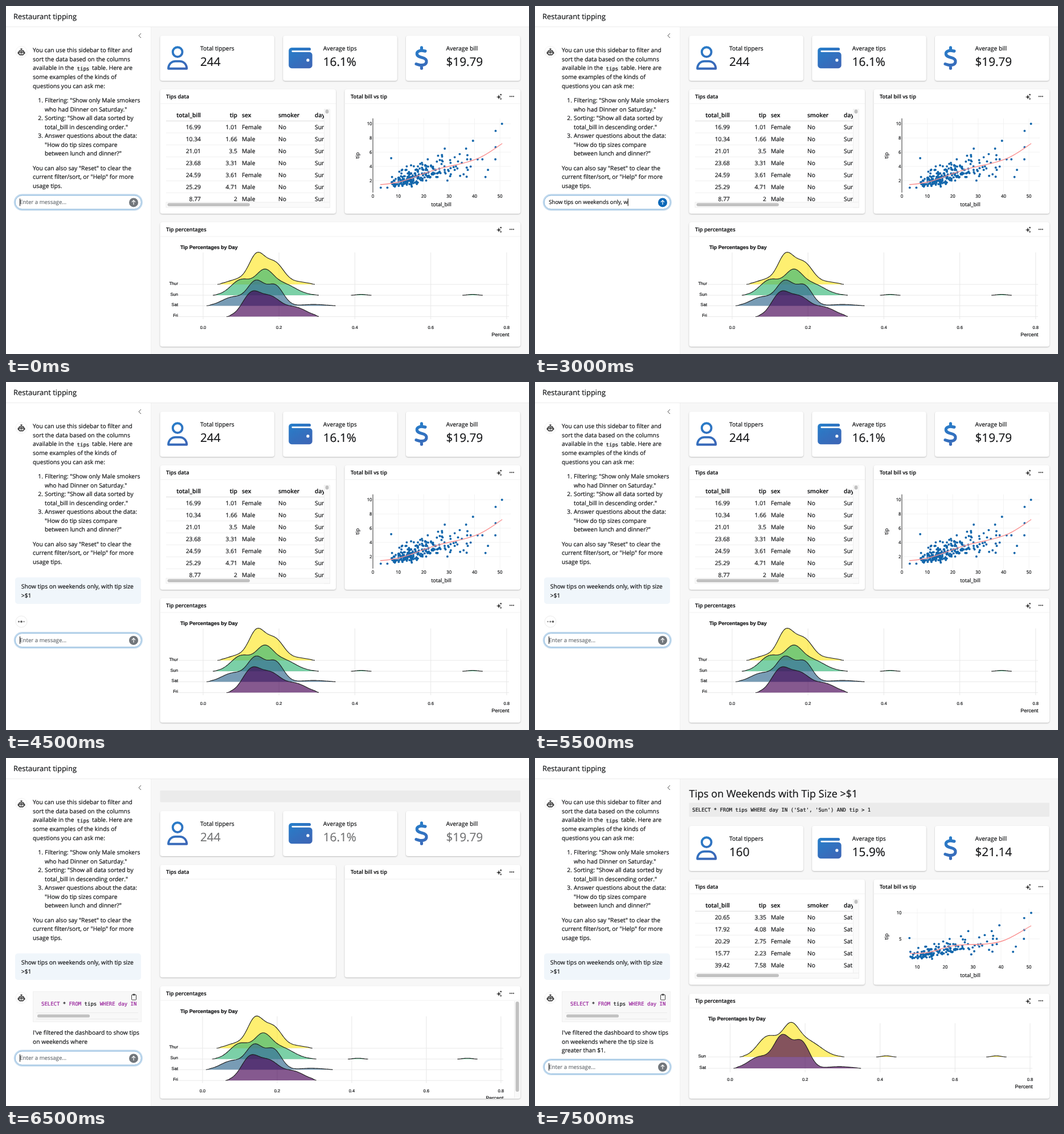
Write an HTML page that moves like this. It is 918x610 px and loops after 8000 ms.

```html
<!DOCTYPE html>
<html lang="en">
<head>
<meta charset="utf-8">
<title>Restaurant tipping</title>
<style>
html, body { margin: 0; width: 100%; height: 100%; overflow: hidden; background: #fff; }
svg { display: block; width: 918px; height: 610px; color: #141517; font-family: "Open Sans", "Noto Sans", sans-serif; }
text, tspan { fill: currentColor; stroke: currentColor; stroke-width: .2px; text-rendering: geometricPrecision; }
.mono { font-family: "DejaVu Sans Mono", "Liberation Mono", monospace; }
.arial { font-family: "Liberation Sans", Arial, sans-serif; }
.bold { font-weight: 600; }
.hint { color: #6b7075; }
.key { color: #961f9a; }
.end { text-anchor: end; }
.mid { text-anchor: middle; }
.card { fill: #fff; filter: drop-shadow(0 1px 1.3px rgba(0, 0, 0, .24)); }
</style>
</head>
<body>
<svg id="stage" viewBox="0 0 918 610" xmlns="http://www.w3.org/2000/svg"></svg>
<script>
const STEP = 500;
const BLUE = '#0767b8', GRAY = '#71767b', GRID = '#ebebeb', THUMB = '#c1c1c1';
const BODY = 10.34, SMALL = 9.66, CODE = 8.97;

// Drawing helpers; text is placed by the middle of its capitals.
const text = (x, y, s, size = BODY, cls = '', attrs = '') =>
  `<text x="${x}" y="${(y + size * .357).toFixed(2)}" font-size="${size}" class="${cls}" ${attrs}>${s}</text>`;
const lines = (x, y, pitch, rows, size) => rows.map((s, i) => text(x, y + i * pitch, s, size)).join('');
const rect = (x, y, w, h, fill, attrs = '') =>
  `<rect x="${x}" y="${y}" width="${w}" height="${h}" fill="${fill}" ${attrs}/>`;
const dot = (x, y, r, fill, attrs = '') => `<circle cx="${x}" cy="${y}" r="${r}" fill="${fill}" ${attrs}/>`;
const path = (d, attrs) => `<path d="${d}" ${attrs}/>`;
const stroke = (d, color, w = 1) => path(d, `fill="none" stroke="${color}" stroke-width="${w}"`);
const hline = (x1, x2, y, color = GRID, w = 1) => stroke(`M${x1} ${y}H${x2}`, color, w);
const vline = (x, y1, y2, color = GRID, w = 1) => stroke(`M${x} ${y1}V${y2}`, color, w);
const group = (inner, attrs) => `<g ${attrs}>${inner}</g>`;
const clip = (id, x, y, w, h, inner) =>
  `<clipPath id="${id}">${rect(x, y, w, h, '#000')}</clipPath>` + group(inner, `clip-path="url(#${id})"`);
const each = (list, fn) => list.map(fn).join('');

const ruler = document.createElement('canvas').getContext('2d');
ruler.font = `100px "Open Sans", "Noto Sans", sans-serif`;
const widthOf = s => ruler.measureText(s).width * SMALL / 100;

// Icons
const defs = `<defs><linearGradient id="tint" gradientUnits="userSpaceOnUse" x1="0" y1="0" x2="300" y2="512">
  <stop offset="0" stop-color="#2580cb"/><stop offset="1" stop-color="#3c67b7"/></linearGradient></defs>`;
const ICON = {
  user: dot(224, 128, 104, 'none', 'stroke="url(#tint)" stroke-width="48"') +
    path('M25 488C25 395 90 328 178 328H270C358 328 423 395 423 488Z',
      'fill="none" stroke="url(#tint)" stroke-width="48" stroke-linejoin="round"'),
  wallet: path('M64 32H448a32 32 0 0 1 0 64H80a16 16 0 0 0 0 32H448a64 64 0 0 1 64 64V416a64 64 0 0 1-64 64H64a64 64 0 0 1-64-64V96a64 64 0 0 1 64-64zM416 272a32 32 0 1 1 0 64 32 32 0 1 1 0-64z',
    'fill="url(#tint)" fill-rule="evenodd"'),
  dollar: path('M160 32V95M160 415V480M240 109L192 100C120 90 64 112 59 157C50 225 125 235 166 246C235 264 275 285 265 345C255 400 190 420 118 409Q90 404 43 387',
    'fill="none" stroke="url(#tint)" stroke-width="64" stroke-linecap="round"')
};
const robot = y => dot(27, y, 10, '#fff', 'stroke="#f2f2f2"') + group(
  rect(22.6, -2.7, 8.8, 8, 'none', 'rx="2.8" stroke="#222" stroke-width="1.3"') +
  rect(23.6, -1, 6.8, 2.8, '#222', 'rx="1.2"') + dot(25.3, .4, .6, '#fff') + dot(28.7, .4, .6, '#fff') +
  stroke('M25 3.5h4M27-3v-2.4M25.4-5.4h3.2M21.2 0v3.2M32.8 0v3.2', '#222', 1.2), `transform="translate(0 ${y})"`);
const star = (x, y, r) => path(`M${x} ${y - r}q0 ${r} ${r} ${r}q${-r} 0 ${-r} ${r}q0 ${-r} ${-r} ${-r}q${r} 0 ${r} ${-r}`,
  'fill="#222" stroke="#222" stroke-width=".5"');
const tools = y => star(865, y + 1, 3.6) + star(868.6, y - 3, 1.6) + star(868.6, y + 4.3, 1.4) +
  each([-3, 0, 3], d => dot(887.8 + d, y, 1.1, '#222'));

// Cards
function card(x, y, w, h, title, withTools) {
  const head = title ? text(x + 10.5, y + 12.5, title, 9.25, 'bold') + hline(x, x + w, y + 25, '#f1f1f1') : '';
  return rect(x, y, w, h, '#fff', 'rx="4" class="card"') + head + (withTools ? tools(y + 12.5) : '');
}
const panels = (y, h) => card(270.5, y, 308.5, h, 'Tips data') + card(594.5, y, 308.5, h, 'Total bill vs tip', true);
const ridgeCard = y => card(270.5, y, 632.5, 597 - y, 'Tip percentages', true);

function valueBoxes(y, values, fade = 1) {
  const kinds = [['user', 12.5, 'Total tippers'], ['wallet', 10, 'Average tips'], ['dollar', 14.5, 'Average bill']];
  return each(kinds, ([icon, dx, label], i) => {
    const x = 270.5 + i * 215.75;
    return card(x, y, 200.5, 79) + group(ICON[icon], `transform="translate(${x + dx} ${y + 18.3}) scale(.0809)"`) +
      text(x + 70.5, y + 22, label) + text(x + 70.5, y + 46, values[i], 20.7, '', `opacity="${fade}"`);
  });
}

// Data table
const rowsAll = '16.99 1.01 Female|10.34 1.66 Male|21.01 3.5 Male|23.68 3.31 Male|24.59 3.61 Female|25.29 4.71 Male|8.77 2 Male';
const rowsWeekend = '20.65 3.35 Male|17.92 4.08 Male|20.29 2.75 Female|15.77 2.23 Female|39.42 7.58 Male';
function table(top, bottom, rows, day) {
  const row = (y, cells, cls) => each(cells, (s, i) =>
    text([342, 406, 414, 478, 542][i], y, s, BODY, cls + (i < 2 ? ' end' : '')));
  const body = each(rows.split('|'), (line, i) => {
    const y = top + 31 + i * 21;
    return hline(281, 558, y - 10.5, i ? '#f0f0f0' : '#dcdcdc') + row(y, [...line.split(' '), 'No', day], '');
  });
  const head = row(top + 10, ['total_bill', 'tip', 'sex', 'smoker', 'day'], 'bold');
  return clip('view', 281, top, 277.5, bottom - top, head + body) +
    rect(558.5, top, 10, bottom - top + 9, '#fafafa', 'stroke="#eee"') + rect(281, bottom, 287.5, 9, '#fafafa', 'stroke="#eee"') +
    rect(560.5, top + .5, 6, 7, THUMB, 'rx="3"') + rect(283.5, bottom + 1.5, 144.5, 5.5, THUMB, 'rx="2.75"');
}

// Bills and tips: a seeded cloud plus the few far points.
let seed = 20;
const rnd = () => (seed = (seed * 1664525 + 1013904223) % 4294967296) / 4294967296;
const bell = () => (rnd() + rnd() + rnd() + rnd() - 2) * 1.73;
const clamp = (v, low, high) => Math.min(high, Math.max(low, v));
const cloud = n => Array.from({ length: n }, () => {
  const bill = clamp(Math.exp(2.88 + .42 * bell()), 7.3 + rnd(), 36 + 3 * rnd());
  const tip = clamp(.28 * bill ** .78 * Math.exp(.27 * bell()), 1.15, 6.5);
  return [bill, rnd() < .3 ? Math.max(1.25, Math.round(tip * 2) / 2) : tip];
});
const weekend = [[50.8, 10], [48.3, 9], [48.3, 6.7], [48.2, 5], [39.4, 7.6], [45.3, 3.5], [44.3, 2.5], [7.2, 5.15], ...cloud(152)];
const everyDay = [...weekend, [3.1, 1], [5.7, 1], [41.2, 5], [43.1, 5], ...cloud(80)];

function scatter(o) {
  const X = v => o.x0 + v * o.kx, Y = v => o.y0 - v * o.ky;
  return each([10, 20, 30, 40, 50], v => vline(X(v), o.top, o.base, '#f0f0f0', .8) + text(X(v), o.base + 6.5, v, 7.76, 'mid')) +
    each(o.ticks, v => hline(o.left, 886, Y(v), '#f0f0f0', .8) + text(o.left - 1.5, Y(v), v, 7.76, 'end')) +
    (o.zero ? vline(X(0), o.top, o.base, '#444', 1.1) + text(X(0), o.base + 6.5, 0, 7.76, 'mid') : '') +
    each(o.data, ([b, t]) => dot(X(b).toFixed(1), Y(t).toFixed(1), 1.95, '#1266ab')) +
    stroke(o.trend, '#fa9090', 1.4) + text(764, o.base + 21, 'total_bill', 9.05, 'mid') +
    group(text(0, 0, 'tip', 9.05, 'mid'), `transform="translate(616.5 ${o.mid}) rotate(-90)"`);
}

// Ridge plot: each day is a sum of bells [centre, spread, height] over a span.
const DAYS = {
  Thur: { base: 488, span: [371, 543], bells: [[440, 14, 50], [472, 16, 37], [405, 16, 8], [515, 15, 4]] },
  Sun: { base: 507, span: [363, 550], bells: [[453, 15, 36], [413, 18, 27], [485, 23, 20]], bumps: [623.5, 819] },
  Sat: { base: 525.5, span: [352, 579], bells: [[439, 15, 42], [473, 14, 34], [398, 19, 15], [540, 20, 2.4]] },
  Fri: { base: 544.5, span: [387, 550], bells: [[431, 16, 40], [465, 17, 31], [507, 20, 16]] }
};
function hill(o, [from, to], bells, base, fill, grow) {
  let d = '';
  for (let x = from; x <= to; x += 1.5) {
    const edge = Math.min(1, (x - from) / 8, (to - x) / 8);
    const h = bells.reduce((sum, [c, s, k]) => sum + k * Math.exp(-(((x - c) / s) ** 2) / 2), 0) * edge;
    d += `${d ? 'L' : 'M'}${(o.x0 + (x - 346) * o.kx).toFixed(2)} ${(base - h * grow).toFixed(2)}`;
  }
  return path(d, `fill="${fill}" fill-opacity=".65" stroke="#1c1c1c" stroke-width="1.1"`);
}
function ridgePlot(o) {
  const X = v => o.x0 + v * 666 * o.kx, grow = o.grow || 1;
  const grid = each([0, .2, .4, .6, .8], v => vline(X(v), o.top, o.base, '#e9e9e9', 1.1) +
    text(X(v), o.tickY, v.toFixed(1), 7.5, 'mid'));
  const rows = each(o.days, ([name, y]) => hline(303, X(.8) + 4, y, '#e9e9e9', 1.1) + text(o.labelX, y - 2, name, 7.6, 'end'));
  const hills = each(o.days, ([name, y, fill]) => {
    const { span, bells, bumps = [] } = DAYS[name];
    return hill(o, span, bells, y, fill, grow) +
      each(bumps, c => hill(o, [c - 18, c + 18], [[c, 8, 1.5]], y, fill, grow));
  });
  return group(text(o.titleX, o.titleY, 'Tip Percentages by Day', 8.95, '', 'font-weight="700"') + grid + rows + hills +
    text(X(.8) + 4.5, o.tickY + 12.5, 'Percent', 9, 'end'), 'class="arial"');
}
const VIRIDIS = ['#fde725', '#35b779', '#31688e', '#440154'];
const allDays = (x0, kx, dy) => ridgePlot({
  x0, kx, titleX: 306, titleY: 423 + dy, top: 432 + dy, base: 549 + dy, tickY: 563 + dy, labelX: 302,
  days: Object.keys(DAYS).map((name, i) => [name, DAYS[name].base + dy, VIRIDIS[i]])
});
const weekendDays = () => ridgePlot({
  x0: 342.5, kx: .988, grow: 1.32, titleX: 304, titleY: 456.5, top: 465, base: 551, tickY: 563, labelX: 300,
  days: [['Sun', 524, VIRIDIS[0]], ['Sat', 544, VIRIDIS[3]]]
});

// Dashboard states
const total = ['244', '16.1%', '$19.79'];
const overview = valueBoxes(52, total) + panels(146, 218) + table(181, 344, rowsAll, 'Sun') +
  scatter({ x0: 644, kx: 4.46, y0: 330.8, ky: 12.43, ticks: [2, 4, 6, 8, 10], zero: true, left: 644, top: 197, base: 327,
    mid: 262, data: everyDay, trend: 'M657 313C710 310 720 293 778 281S840 262 871 241' }) +
  ridgeCard(379) + allDays(346, 1, 0);

const spinner = (x, y, opacity = 1) =>
  `<ellipse cx="${x}" cy="${y}" rx="2.6" ry="1.5" fill="#0a6ebd" opacity="${opacity}" transform="rotate(30 ${x} ${y})"/>`;
const spinners = each([[591, 40], [591, 60.5], [429, 291.8], [753, 291.8], [586, 504]], p => spinner(...p)) +
  each([405, 621, 837], x => spinner(x, 132, .4));
const waiting = (valueFade, plotFade) => rect(270.5, 57, 632.5, 20.5, GRID, 'rx="1"') +
  valueBoxes(93, total, valueFade) + panels(187.3, 197.2) + ridgeCard(400) +
  clip('plot', 271, 426, 632, 171, group(allDays(345, .983, 20.7), `opacity="${plotFade}"`)) +
  rect(892.5, 426, 10, 170, '#fafafa') + vline(892.5, 426, 596, '#eee') + rect(894.5, 427, 6, 158, THUMB, 'rx="3"');

const filtered = text(270.5, 63, 'Tips on Weekends with Tip Size &gt;$1', 18) + rect(270.5, 78.5, 632.5, 24.5, GRID, 'rx="1"') +
  text(276, 90.7, "SELECT * FROM tips WHERE day IN ('Sat', 'Sun') AND tip &gt; 1", CODE, 'mono') +
  valueBoxes(119, ['160', '15.9%', '$21.14']) + panels(213, 184.5) + table(248, 377, rowsWeekend, 'Sat') +
  scatter({ x0: 622, kx: 4.9, y0: 362.5, ky: 9.1, ticks: [5, 10], left: 645, top: 264, base: 359.5,
    mid: 313, data: weekend, trend: 'M658 342.5C715 344 705 327 765 327S830 317 871 294' }) +
  ridgeCard(413) + weekendDays();

// Sidebar
const tipsList = [
  ['Filtering: "Show only Male smokers', 'who had Dinner on Saturday."'],
  ['Sorting: "Show all data sorted by', 'total_bill in descending order."'],
  ['Answer questions about the data:', '"How do tip sizes compare', 'between lunch and dinner?"']
];
const intro = robot(80.5) + rect(122, 102.5, 26.5, 13, '#f8f8f8', 'rx="2"') +
  lines(47, 77.5, 15.6, ['You can use this sidebar to filter and', 'sort the data based on the columns', 'available in the',
    'some examples of the kinds of', 'questions you can ask me:']) +
  text(124.5, 109.3, 'tips', 9.05, 'mono') + text(151, 108.7, 'table. Here are') +
  each(tipsList, (rows, i) => text(56.3, 165.7 + i * 30.9, `${i + 1}.`) + lines(68, 165.7 + i * 30.9, 15.4, rows)) +
  lines(47, 284, 15.5, ['You can also say "Reset" to clear the', 'current filter/sort, or "Help" for more', 'usage tips.']);

const frame = rect(0, 0, 918, 610, '#fff') + rect(255, 37, 663, 573, '#f7f7f7') + hline(0, 918, 36.5) +
  vline(254.5, 37, 610, '#f1f1f1') + text(13, 18, 'Restaurant tipping', 12.93) + stroke('M237 48L233 52L237 56', '#555');

// Message box with the rows typed so far; the caret follows the last row.
function entry(y, rows, caret, color = GRAY) {
  const last = Math.max(0, rows.length - 1), by = y + last * 14.4;
  const x = 24.5 + widthOf(rows[last] || '');
  const ring = (pad, tone, w) => rect(16.3 - pad, y - 11.9 - pad, 221 + 2 * pad, by - y + 24 + 2 * pad, '#fff',
    `rx="${12 + pad}" stroke="${tone}" stroke-width="${w}"`);
  const label = rows.length ? lines(24.2, y, 14.4, rows.map(s => s.replace('>', '&gt;')), SMALL)
    : text(24.2, y, 'Enter a message...', SMALL, 'hint');
  return ring(1.3, '#c1d9ed', 2.6) + ring(0, '#83b3db', .9) + label + (caret ? vline(x, by - 6.5, by + 6.5, '#111') : '') +
    dot(224, by + .4, 8, color) + stroke(`M224 ${by + 4.2}v-7.2m-3.1 2.8l3.1-3.1l3.1 3.1`, '#fff', 1.2);
}
const question = 'Show tips on weekends only, with tip size', limit = '>$1';
const bubble = rect(16, 342.5, 221, 46.5, '#f0f6fb', 'rx="5"') + lines(26.8, 358.5, 15.5, [question, '&gt;$1']);
const thinking = phase => dot(27, 420, 10, '#fff', `stroke="${GRID}"`) + each([0, 1, 2], i => {
  const dim = (i + phase) % 3;
  return dot(22.5 + i * 4.5, 420, 1.35 + .25 * dim, ['#9a9a9a', '#777', '#555'][dim]);
});

const key = s => `<tspan class="key">${s}</tspan>`;
const answer = (rows, streaming) => bubble + robot(420.5) +
  rect(47.5, 409.5, 190, streaming ? 67 : 53, '#f8f8f8', 'stroke="#f0f0f0"') +
  text(62, 431, `${key('SELECT')} * ${key('FROM')} tips ${key('WHERE day IN')}`, CODE, 'mono') +
  hline(53, 232, 446.5) + hline(53, 232, 457.5) + rect(55, 449.5, 92, 5.3, THUMB, 'rx="2.6"') +
  rect(220.5, 415, 8, 9, 'none', 'rx="1" stroke="#444"') + rect(222.3, 413.6, 4.4, 2.6, '#444', 'rx=".8"') +
  (streaming ? dot(59, 464.3, 1.3, '#666') : '') + lines(47, 481.5, 15.4, rows);
const reply = ["I've filtered the dashboard to show tips", 'on weekends where the tip size is', 'greater than $1.'];

const idle = on => [entry(344, [], on), overview];
const typing = (n, color = BLUE) => [entry(344, [question.slice(0, n)], true, color), overview];
const wrapped = (n, caret) => [entry(344, [question, limit.slice(0, n)], caret, BLUE), overview];
const asked = (phase, on) => [bubble + thinking(phase) + entry(452.5, [], on), overview];
const replied = answer(reply, false);

// One scene per step: sidebar, dashboard
const makeScenes = () => [
  idle(true), idle(false), idle(true), idle(false),
  typing(1, '#396f9c'), typing(16), typing(29), wrapped(1, true), wrapped(3, false),
  asked(1, true), asked(2, false), asked(0, true),
  [answer([], true) + entry(508.5, [], false), waiting(1, 1)],
  [answer([reply[0], 'on weekends where'], false) + entry(526, [], true), waiting(.6, 1)],
  [replied + entry(541.4, [], false), waiting(.33, .3) + spinners],
  [replied + entry(541.4, [], true), filtered]
];

const stage = document.getElementById('stage'), scenes = makeScenes();
let shown = -1;
function tick() {
  const step = Math.floor(performance.now() / STEP) % scenes.length;
  if (step !== shown) {
    shown = step;
    stage.innerHTML = defs + frame + intro + scenes[step].join('');
  }
  requestAnimationFrame(tick);
}
tick();
</script>
</body>
</html>
```
